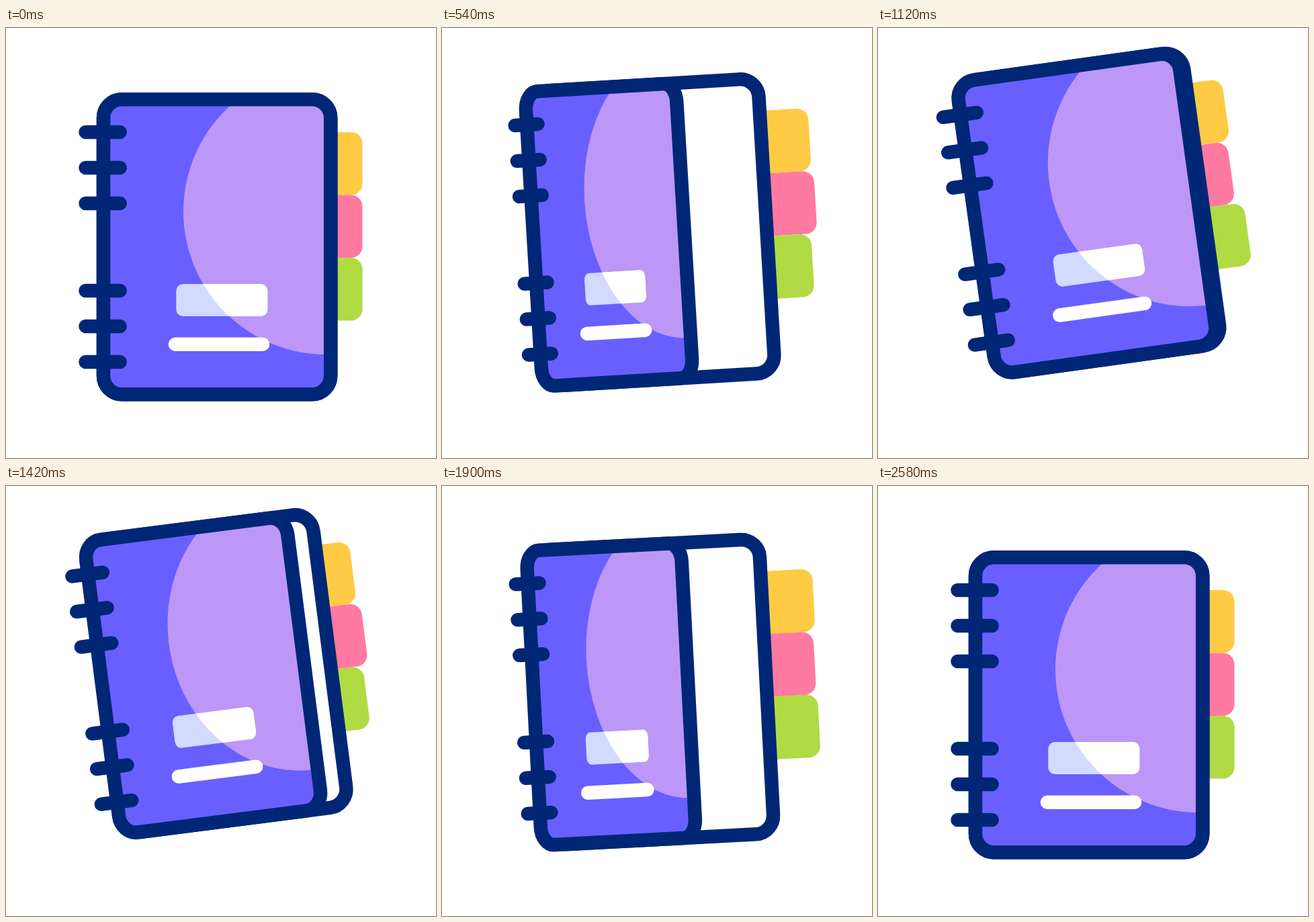
An HTML page with a canvas that plays this animation: 640 px wide and 640 px high, repeating every 2.62 s.

```html
<!DOCTYPE html>
<html lang="en">
<head>
<meta charset="utf-8">
<title>Notebook</title>
<style>
  html, body { margin: 0; height: 100%; overflow: hidden; background: #fff; }
  canvas { display: block; width: 100vw; height: 100vh; }
</style>
</head>
<body>
<canvas width="640" height="640"></canvas>
<script>
const ctx = document.querySelector('canvas').getContext('2d');
const LOOP = 2620, CYCLE = 1200;
const NAVY = '#002776';
const CENTER = { x: 314, y: 325.5 };
const HINGE = 118.3;
const TABS = [
  { y: 155, color: '#ffcb45', delay: 100, reach: 29.5 },
  { y: 248.5, color: '#ff7aa0', delay: 0, reach: 28.3 },
  { y: 342, color: '#b0db43', delay: 200, reach: 30 },
];
const RINGS = [155, 208, 261, 391, 444, 497];

const smooth = u => u * u * (3 - 2 * u);
// Eases 0 -> 1 -> 0 over the given period
const swing = (t, period) => smooth(1 - Math.abs(2 * (t % period) / period - 1));
// Two swings, starting after a delay
const twice = t => t > 0 && t < 2 * CYCLE ? swing(t, CYCLE) : 0;

const cover = () => ctx.roundRect(145, 106.3, 338.2, 439, 27.5);
const disc = () => ctx.arc(477, 273, 213, 0, 2 * Math.PI);
const label = () => ctx.roundRect(253.3, 381, 136, 48, 10);
const line = (x1, x2, y) => { ctx.moveTo(x1, y); ctx.lineTo(x2, y); };

function fill(color) {
  ctx.fillStyle = color;
  ctx.fill();
}

function stroke(color) {
  ctx.strokeStyle = color;
  ctx.stroke();
}

function draw(t) {
  const lift = t < 2 * CYCLE ? swing(t, 2 * CYCLE) : 0;
  const squeeze = 1 - 0.345 * twice(t);

  // Path on the front cover: squeezed outline, constant stroke width
  const front = build => {
    ctx.save();
    ctx.translate(HINGE, 0);
    ctx.scale(squeeze, 1);
    ctx.translate(-HINGE, 0);
    ctx.beginPath();
    build();
    ctx.restore();
  };

  ctx.fillStyle = '#fff';
  ctx.fillRect(0, 0, 640, 640);
  ctx.save();
  ctx.lineWidth = 20.5;
  ctx.lineCap = 'round';
  ctx.translate(CENTER.x, CENTER.y - 51.3 * lift);
  ctx.rotate(-8 * lift * Math.PI / 180);
  ctx.translate(-CENTER.x, -CENTER.y);

  for (const { y, color, delay, reach } of TABS) {
    ctx.beginPath();
    ctx.roundRect(440, y, 90.5 + reach * twice(t - delay), 93.5, 17);
    fill(color);
  }

  ctx.beginPath();
  cover();
  fill('#fff');
  stroke(NAVY);

  front(cover);
  fill('#695fff');
  ctx.save();
  ctx.clip();
  front(disc);
  fill('#bc97f7');
  ctx.restore();

  front(label);
  fill('#d2daff');
  ctx.save();
  front(disc);
  ctx.clip();
  front(label);
  fill('#fff');
  ctx.restore();

  front(() => line(252, 382, 470.7));
  stroke('#fff');
  front(cover);
  stroke(NAVY);
  front(() => RINGS.forEach(y => line(118.5, 169.7, y)));
  stroke(NAVY);
  ctx.restore();
}

function tick() {
  draw(performance.now() % LOOP);
  requestAnimationFrame(tick);
}
tick();
</script>
</body>
</html>
```
